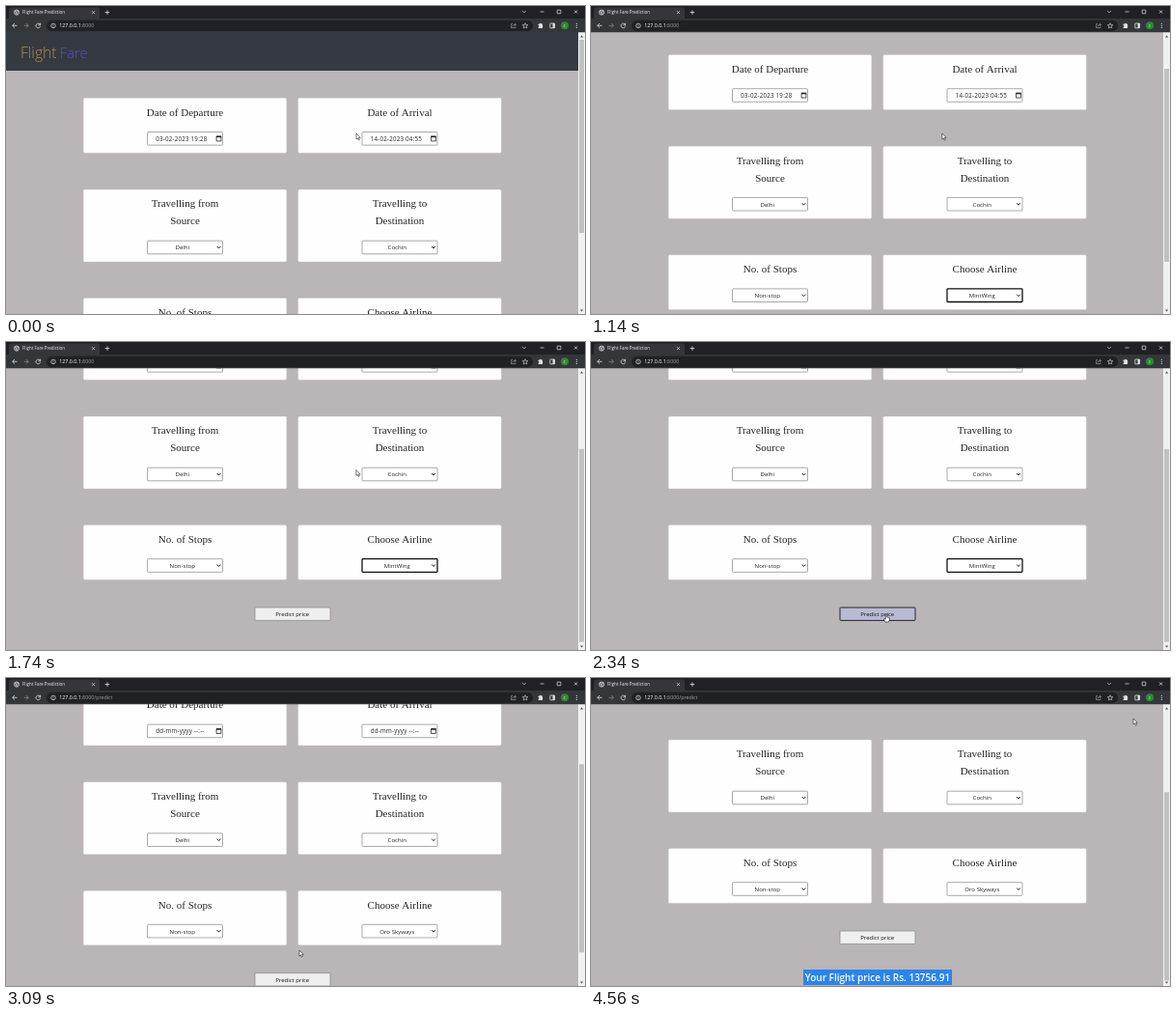
These frames come from a looping animation (600x319 px, 4.59 s). An HTML page with a canvas:

```html
<!DOCTYPE html>
<html lang="en">
<head>
<meta charset="utf-8">
<title>Flight Fare Prediction</title>
<style>
html, body { margin: 0; width: 100%; height: 100%; overflow: hidden; background: #bab5b7; }
canvas { display: block; width: 600px; height: 319px; }
</style>
</head>
<body>
<canvas id="stage"></canvas>
<script>
const canvas = document.getElementById('stage');
const ctx = canvas.getContext('2d');
const ratio = window.devicePixelRatio || 1;
canvas.width = 600 * ratio;
canvas.height = 319 * ratio;

const LOOP = 4590, LOADED = 2550;
const SANS = '"Open Sans", sans-serif', SERIF = '"Liberation Serif", serif';
const COLUMNS = [185.5, 408];

// Rows of [time, value...]; linear in between.
const SCROLL = [[0, 0], [690, 0], [870, 21.5], [1440, 70.5], [1650, 100], [1740, 113],
  [LOADED - 1, 113], [LOADED, 0], [2715, 0], [2880, 36.5], [3090, 82], [3210, 126]];
const POINTER = [[0, 363, 132], [570, 364, 132], [1100, 364, 132], [1440, 363, 132], [1740, 363, 132],
  [1920, 338, 215], [2160, 306, 282], [2500, 306, 282], [2600, 304, 282], [3290, 304, 282],
  [3480, 217, 310], [3540, 217, 310], [3800, 385, 310], [3850, 385, 310], [4140, 470, 160], [4440, 562, 42]];

function sample(keys, t) {
  const next = keys.findIndex(k => k[0] > t);
  if (next < 0) return keys[keys.length - 1].slice(1);
  const a = keys[next - 1], b = keys[next], p = (t - a[0]) / (b[0] - a[0]);
  return a.slice(1).map((v, i) => v + (b[i + 1] - v) * p);
}

function rect(x, y, w, h, fill, radius = 0, stroke, weight = 0.7) {
  ctx.beginPath();
  ctx.roundRect(x, y, w, h, radius);
  if (fill) { ctx.fillStyle = fill; ctx.fill(); }
  if (stroke) { ctx.strokeStyle = stroke; ctx.lineWidth = weight; ctx.stroke(); }
}

function text(str, x, y, size, fill, align = 'left', family = SANS, weight = 400) {
  ctx.font = `${weight} ${size}px ${family}`;
  ctx.textAlign = align;
  ctx.fillStyle = fill;
  ctx.fillText(str, x, y);
}

function path(d, x, y, stroke, weight = 0.8, fill) {
  ctx.save();
  ctx.translate(x, y);
  const shape = new Path2D(d);
  if (fill) { ctx.fillStyle = fill; ctx.fill(shape); }
  if (stroke) { ctx.strokeStyle = stroke; ctx.lineWidth = weight; ctx.stroke(shape); }
  ctx.restore();
}

function circle(x, y, r, fill, stroke) {
  rect(x - r, y - r, 2 * r, 2 * r, fill, r, stroke);
}

function card(col, y, h, lines) {
  rect(COLUMNS[col] - 105.3, y, 210.6, h, '#fefefe', 1.5, '#c9c6c8', 0.4);
  lines.forEach((line, i) => text(line, COLUMNS[col], y + 18.3 + 18 * i, 11, '#212529', 'center', SERIF));
}

function field(col, y, focused) {
  const x = COLUMNS[col] - 39;
  rect(x, y, 78, 13.6, '#fff', 0.8, focused ? '#101010' : '#858585', focused ? 1.3 : 0.7);
  return x;
}

function select(col, y, value, focused) {
  const x = field(col, y, focused);
  text(value, x + 36.3, y + 9.2, 6.1, '#222', 'center');
  path('M-1.8 -1L0 1L1.8 -1', x + 74, y + 6.8, '#222', 1);
}

function dateInput(col, y, value) {
  const x = field(col, y);
  ctx.letterSpacing = '0.22px';
  text(value, x + 8.8, y + 9.2, 6.2, '#222');
  ctx.letterSpacing = '0px';
  rect(x + 71.6, y + 4.6, 4.8, 4.8, null, 0, '#222', 0.8);
  rect(x + 71.4, y + 4.1, 5.2, 1.5, '#222');
}

function result(selectedTo) {
  const draw = fill => text('Your Flight price is Rs. 13756.91', 297, 440, 10, fill, 'center', SANS, 600);
  draw('#212529');
  if (selectedTo <= 220) return;
  ctx.save();
  ctx.beginPath();
  ctx.rect(220, 428, selectedTo - 220, 16.3);
  ctx.clip();
  rect(220, 428, 154, 16.3, '#2b84ea');
  draw('#fff');
  ctx.restore();
}

function page(scroll, second, hover, selectedTo) {
  ctx.save();
  ctx.beginPath();
  ctx.rect(0, 27, 593, 292);
  ctx.clip();
  rect(0, 27, 593, 292, '#bab5b7');
  ctx.translate(0, -scroll);
  rect(0, 27, 593, 40, '#343a40');
  text('Flight', 15, 54, 15.6, '#b58b42', 'left', SANS, 300);
  text('Fare', 55.5, 54, 15, '#5b4bc4', 'left', SANS, 300);

  card(0, 95.3, 57, ['Date of Departure']);
  card(1, 95.3, 57, ['Date of Arrival']);
  dateInput(0, 130.5, second ? 'dd-mm-yyyy --:--' : '03-02-2023 19:28');
  dateInput(1, 130.5, second ? 'dd-mm-yyyy --:--' : '14-02-2023 04:55');
  card(0, 190, 75, ['Travelling from', 'Source']);
  card(1, 190, 75, ['Travelling to', 'Destination']);
  select(0, 243.2, 'Delhi');
  select(1, 243.2, 'Cochin');
  card(0, 302.6, 56.6, ['No. of Stops']);
  card(1, 302.6, 56.6, ['Choose Airline']);
  select(0, 337.7, 'Non-stop');
  select(1, 337.7, second ? 'Oro Skyways' : 'MintWing', !second);

  rect(258, 388, 78, 13.4, hover ? '#b9bad3' : '#efefef', 0.8, hover ? '#26262c' : '#858585', hover ? 1 : 0.7);
  text('Predict price', 296.7, 397, 6, '#111', 'center');
  if (second) result(selectedTo);
  ctx.restore();

  rect(593, 27, 7, 292, '#f1f1f1');
  rect(594, 35 + scroll * (second ? 0.66 : 0.67), 5, second ? 195 : 200, '#c1c1c1');
  path('M-1.6 1L0 -1L1.6 1Z', 596.6, 31.5, null, 0, '#505050');
  path('M-1.6 -1L0 1L1.6 -1Z', 596.6, 315.5, null, 0, '#505050');
}

function browser(second) {
  const light = '#dfe1e5', dim = '#9aa0a6';
  rect(0, 0, 600, 13, '#202124');
  rect(3, 1.5, 94, 14, '#35363a', 2.5);
  rect(0, 13, 600, 14.3, '#35363a');
  circle(11, 6.6, 2.6, '#5f6368', light);
  path('M-2 -1L0 -.4L-.3 1.2L1 2M.6 -2L2 -.3', 11, 6.6, light, 0.7);
  text('Flight Fare Prediction', 17, 8.3, 4.5, '#eee');
  const cross = 'M-1.5 -1.5L1.5 1.5M1.5 -1.5L-1.5 1.5';
  path(cross, 90.5, 6.6, light, 0.7);
  path('M-2.3 0H2.3M0 -2.3V2.3', 105, 6.6, light);
  path('M-1.8 -.9L0 .9L1.8 -.9', 537, 6, light, 0.7);
  path('M-2 0H2', 555.5, 6, light, 0.7);
  rect(571.2, 4.2, 3.6, 3.6, null, 0, light, 0.7);
  path(cross, 590.5, 6, light);

  const arrow = 'M2.4 0H-2.2M0 -2.3L-2.3 0L0 2.3';
  path(arrow, 9, 20.3, light);
  path('M-2.4 0H2.2M0 -2.3L2.3 0L0 2.3', 21, 20.3, '#85878b');
  path('M1.7 -1.5A2.3 2.3 0 1 0 2.3 .5M2.3 -2.6V-.5H.2', 33.3, 20.3, light);
  rect(42, 14.8, 504, 11.2, '#202124', 5.6);
  circle(49, 20.4, 2.3, null, light);
  path('M0 -1.3V-.7M0 -.1V1.4', 49, 20.4, light, 0.7);
  text('127.0.0.1', 55.3, 22.4, 5.3, '#fff');
  const end = 55.3 + ctx.measureText('127.0.0.1').width;
  text(second ? ':8000/predict' : ':8000', end, 22.4, 5.3, dim);

  path('M-.8 -1.8H-2.4V2.2H2V1M-1 .8Q-.7 -1.2 2.4 -1.1M1 -2.5L2.5 -1.1L1 .3', 526, 20.4, dim, 0.7);
  path('M0 -2.7L.8 -.8L2.8 -.7L1.2 .6L1.8 2.5L0 1.4L-1.8 2.5L-1.2 .6L-2.8 -.7L-.8 -.8Z', 538, 20.4, light, 0.6);
  path('M-2.4 -1.6H-.9A.9 .9 0 0 1 .9 -1.6H1.9V0A.9 .9 0 0 1 1.9 1.6V2.7H-2.4V1.5A.8 .8 0 0 0 -2.4 -.2Z', 554, 20.2, null, 0, light);
  rect(563.8, 18, 4.8, 4.8, null, 0.4, light, 0.8);
  rect(566.5, 18, 2.1, 4.8, light);
  circle(579, 20.3, 4, '#2f8a2f');
  text('c', 579, 21.7, 4.8, '#d6efd6', 'center');
  for (const dy of [-2, 0, 2]) circle(591.3, 20.3 + dy, 0.6, light);
}

function pointer(x, y, kind) {
  if (kind === 'beam') {
    path('M-1.2 -3.5H1.2M0 -3.5V3.5M-1.2 3.5H1.2', x, y, '#111', 0.7);
  } else if (kind === 'hand') {
    path('M-.7 .3Q0 -.5 .7 .3V3L3.3 3.8V6L2.4 8H-1L-2.8 5L-2 4.3L-.7 5.3Z', x, y, '#111', 0.6, '#fff');
  } else {
    path('M0 0V6L1.4 4.8L2.4 7L3.4 6.5L2.5 4.4H4.2Z', x, y, '#222', 0.6, '#fff');
  }
}

function draw(t) {
  const second = t >= LOADED;
  const [scroll] = sample(SCROLL, t);
  const [x, y] = sample(POINTER, t);
  const hover = !second && t >= 2120;
  const selectedTo = t < 3540 ? 220 : t < 3800 ? Math.min(374, Math.max(220, x)) : 374;
  ctx.setTransform(ratio, 0, 0, ratio, 0, 0);
  page(scroll, second, hover, selectedTo);
  browser(second);
  pointer(x, y, hover ? 'hand' : t > 3440 && t < 3870 ? 'beam' : 'arrow');
}

function tick() {
  draw(performance.now() % LOOP);
  requestAnimationFrame(tick);
}
tick();
</script>
</body>
</html>
```
